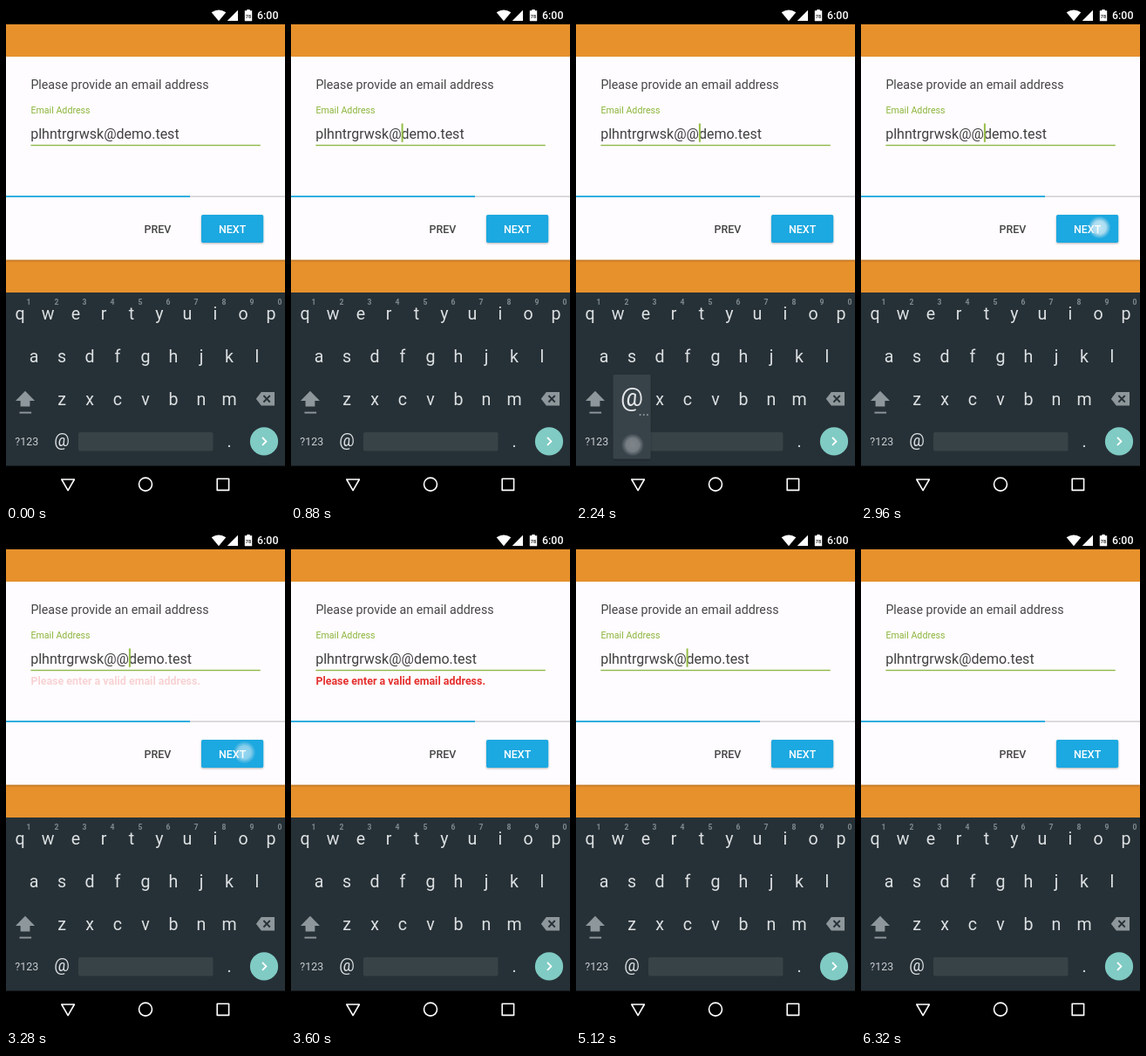
Animation, 320 px wide and 569 px high, one loop 6800 ms. Source, as an HTML page:

```html
<!DOCTYPE html>
<html lang="en">
<head>
<meta charset="utf-8">
<title>Email form validation</title>
<style>
  html, body { margin: 0; width: 100%; height: 100%; overflow: hidden; background: #000; }
  svg { display: block; width: 100%; height: 100%; font-family: Roboto, sans-serif; }
  text { white-space: pre; }
  .mid { text-anchor: middle; }
  .button { font-size: 12.44px; font-weight: 500; }
  .key { font-size: 19.6px; fill: #dce0e2; text-anchor: middle; }
  .hint { font-size: 8.6px; font-weight: 700; fill: #7f898e; text-anchor: middle; }
</style>
</head>
<body>
<svg id="stage" viewBox="0 0 320 569">
  <defs>
    <radialGradient id="glow">
      <stop offset="0" stop-color="#fff" stop-opacity=".72"/>
      <stop offset=".58" stop-color="#f4f6f8" stop-opacity=".66"/>
      <stop offset=".76" stop-color="#e4eaee" stop-opacity=".4"/>
      <stop offset="1" stop-color="#dfe8ee" stop-opacity="0"/>
    </radialGradient>
    <filter id="shadow" x="-20%" y="-20%" width="140%" height="150%">
      <feDropShadow dx="0" dy="1" stdDeviation="1" flood-opacity=".3"/>
    </filter>
  </defs>

  <rect width="320" height="569" fill="#000"/>
  <rect y="21" width="320" height="307" fill="#e7912d"/>

  <!-- Status bar -->
  <g fill="#fff">
    <path d="M244 17.3 235.7 7.2Q244 1.8 252.3 7.2Z"/>
    <path d="M266 4.8V17H253.8Z"/>
    <path d="M276.3 4h3.4v1.3h2.5V17.2h-8.4V5.3h2.5Z"/>
    <text x="288" y="15.3" class="button">6:00</text>
  </g>
  <text x="278" y="13.6" class="mid" font-size="5.6" font-weight="700" fill="#333">78</text>

  <!-- Form card -->
  <rect y="58" width="320" height="232.5" fill="#fefcfe" filter="url(#shadow)"/>
  <text x="28.4" y="95" font-size="14.22" fill="#454545">Please provide an email address</text>
  <text x="28.4" y="123" font-size="10.67" fill="#8db53c">Email Address</text>
  <text id="email" x="28.2" y="151.6" font-size="16" fill="#404040"></text>
  <rect x="28.4" y="158.8" width="263.4" height="1.4" fill="#8fb84a"/>
  <rect id="caret" y="134.5" width="2" height="21.3" fill="#96bd46"/>
  <text id="error" x="28.4" y="176.3" font-size="12.44" font-weight="700" fill="#e4312f">Please enter a valid email address.</text>
  <rect y="217.2" width="320" height="1.8" fill="#d7d6d8"/>
  <rect y="217.2" width="211" height="1.8" fill="#1ca8e0"/>
  <text x="174" y="259.6" class="button mid" fill="#454545">PREV</text>
  <rect x="224" y="239" width="71.2" height="32" rx="1.8" fill="#1ca8e0" filter="url(#shadow)"/>
  <text x="259.6" y="259.6" class="button mid" fill="#fff">NEXT</text>

  <!-- Keyboard -->
  <rect y="328" width="320" height="198.5" fill="#263137"/>
  <rect id="pressed" x="278" y="431" width="39.5" height="37" fill="#3e494f"/>
  <g id="keys"></g>
  <g fill="#8e979b">
    <path d="M22 440.8 33 452H27.4V458.4H16.6V452H11Z"/>
    <rect x="15.5" y="464.6" width="13.6" height="1.9"/>
    <path d="M292.8 442H308V457.5H292.8L286.8 449.8Z"/>
  </g>
  <path d="m295.4 446 7.4 7.5m0-7.5-7.4 7.5" stroke="#263137" stroke-width="1.8"/>
  <text x="23.8" y="503" class="mid" font-size="12.44" fill="#c8cdd0">?123</text>
  <rect x="83" y="488" width="154.5" height="21.4" rx="2" fill="#374347"/>
  <circle cx="296" cy="498.4" r="16.1" fill="#80cbc4"/>
  <path d="m294 494 4.4 4.4-4.4 4.4" fill="none" stroke="#fff" stroke-width="1.8"/>

  <!-- Key preview -->
  <g id="popup">
    <rect x="42.6" y="422" width="43" height="96.5" rx="1.5" fill="#37434a" filter="url(#shadow)"/>
    <text x="64" y="457.6" class="mid" font-size="29" fill="#e3e6e8">@</text>
    <g fill="#8b959a">
      <circle cx="73.6" cy="468" r="1.1"/>
      <circle cx="77.8" cy="468" r="1.1"/>
      <circle cx="82" cy="468" r="1.1"/>
    </g>
  </g>

  <!-- Navigation bar -->
  <g fill="none" stroke="#fff" stroke-width="1.6" stroke-linejoin="round">
    <path d="M63.8 542H78.4L71.1 554.6Z"/>
    <circle cx="160" cy="547.6" r="7.5"/>
    <rect x="242.2" y="541.2" width="13.4" height="13.2"/>
  </g>

  <circle id="touch" r="13" fill="url(#glow)"/>
</svg>
<script>
  const LOOP = 6800, STEP = 80;
  const USER = "plhntrgrwsk", HOST = "demo.test";
  const DOUBLE_AT = [2160, 4640];
  const POPUP = [2000, 2400];
  const PRESSED = [4560, 4880];
  const CARET_ON = [
    [80, 480], [880, 1280], [1680, 2480], [2960, 3360],
    [3840, 4160], [4560, 4960], [5120, 5520], [5920, 6320]
  ];
  const TAPS = [
    { x: 65, y: 502.5, from: 1680, fade: 2080, end: 2400 },
    { x: 273.5, y: 253.5, from: 2960, fade: 3200, end: 3520 },
    { x: 308, y: 448.3, from: 4160, fade: 4720, end: 4960 }
  ];

  const $ = id => document.getElementById(id);
  const email = $("email"), caret = $("caret"), error = $("error");
  const popup = $("popup"), pressed = $("pressed"), touch = $("touch");

  const within = (t, [from, to]) => t >= from && t < to;
  const ramp = (t, from, to) => Math.min(1, Math.max(0, (t - from) / (to - from)));
  const show = (el, amount) => el.setAttribute("opacity", Number(amount));

  function addKey(label, x, y, cls = "key") {
    const el = document.createElementNS("http://www.w3.org/2000/svg", "text");
    el.setAttribute("class", cls);
    el.setAttribute("x", x);
    el.setAttribute("y", y);
    el.textContent = label;
    $("keys").append(el);
  }

  function addRow(letters, x, y, cls) {
    [...letters].forEach((c, i) => addKey(c, x + 32 * i, y, cls));
  }

  addRow("qwertyuiop", 16, 358.8);
  addRow("1234567890", 26, 341.6, "hint");
  addRow("asdfghjkl", 32, 407.8);
  addRow("zxcvbnm", 64, 456.6);
  addKey("@", 64, 504.2);
  addKey(".", 256, 505);

  function draw(time) {
    const t = Math.floor((time % LOOP) / STEP) * STEP;
    const doubled = within(t, DOUBLE_AT);
    const text = USER + (doubled ? "@@" : "@") + HOST;
    if (email.textContent !== text) email.textContent = text;

    caret.setAttribute("x", doubled ? 140.9 : 126.6);
    show(caret, CARET_ON.some(span => within(t, span)));
    show(error, ramp(t, 3200, 3600) * (1 - ramp(t, 4720, 4960)));
    show(popup, within(t, POPUP));
    show(pressed, within(t, PRESSED));

    const tap = TAPS.find(p => within(t, [p.from, p.end]));
    show(touch, tap ? 1 - ramp(t, tap.fade, tap.end) : 0);
    if (tap) {
      touch.setAttribute("cx", tap.x);
      touch.setAttribute("cy", tap.y);
    }
  }

  const start = performance.now();
  function tick() {
    draw(performance.now() - start);
    requestAnimationFrame(tick);
  }
  tick();
</script>
</body>
</html>
```
